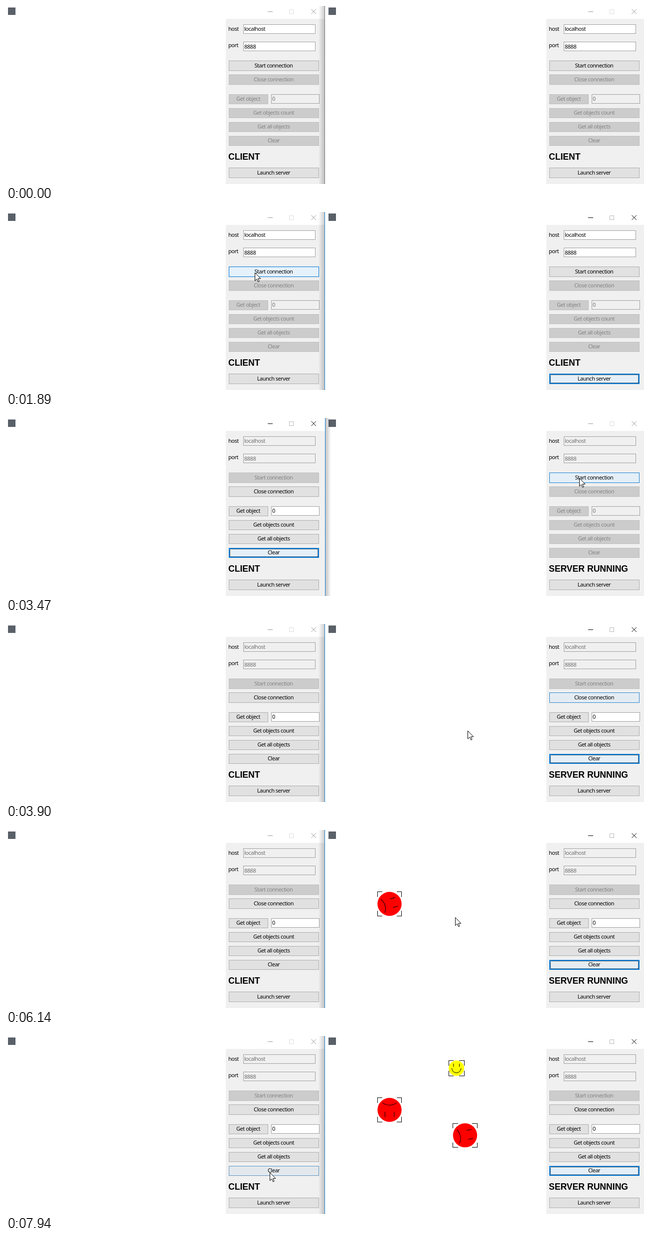
An HTML page that plays this animation: 1280 by 359 pixels, repeating every 7990 ms.

```html
<!DOCTYPE html>
<html lang="en">
<head>
<meta charset="utf-8">
<title>Client and server windows</title>
<style>
  html, body { margin: 0; width: 100%; height: 100%; overflow: hidden; background: #fff; }
  svg { display: block; width: 1280px; height: 359px; }
  text { font: 11px "Noto Sans", "Open Sans", sans-serif; letter-spacing: -.5px; white-space: pre; }
  .title { font: bold 17.6px "Liberation Sans", Arial, sans-serif; letter-spacing: 0; }
  .crisp { shape-rendering: crispEdges; }
</style>
</head>
<body>
<svg id="stage" viewBox="0 0 1280 359">
  <defs>
    <linearGradient id="toRight"><stop offset="0" stop-opacity="0"/><stop offset="1" stop-opacity=".2"/></linearGradient>
    <linearGradient id="toLeft"><stop offset="0" stop-opacity=".24"/><stop offset="1" stop-opacity="0"/></linearGradient>
  </defs>
</svg>
<script>
const LOOP = 7990;
const CLICK = { launch: 450, startLeft: 1940, startRight: 3560 };
const LINKED = { left: 2050, right: 3615 };

// Bursts of screen updates: first time, last time, number of updates.
const BURSTS = [
  [310, 820, 10], [1050, 1840, 18], [1890, 1890, 1], [2020, 2630, 14], [2700, 3470, 17],
  [3520, 4310, 18], [4360, 5150, 18], [5180, 5940, 17], [5990, 6780, 18],
  [6830, 7580, 17], [7630, 7940, 8]
];

// Pointer path: time, x, y. Equal neighbours are rests.
const PATH = [
  [310, 1105, 362], [520, 1124, 338], [1050, 1124, 338], [1450, 820, 215], [1690, 545, 135],
  [1840, 499, 122], [2100, 499, 122], [2320, 540, 146], [2480, 622, 158], [2630, 650, 197],
  [2700, 650, 197], [3000, 820, 182], [3300, 1085, 128], [3470, 1150, 121], [3590, 1150, 121],
  [3720, 1100, 148], [3900, 920, 218], [4150, 795, 287], [4310, 757, 303], [4360, 757, 303],
  [4860, 769, 149], [5150, 769, 149], [5500, 868, 222], [5850, 903, 142], [6140, 901, 177],
  [6500, 920, 199], [6620, 920, 199], [7100, 906, 78], [7200, 904, 65], [7280, 904, 65],
  [7430, 894, 102], [7580, 669, 210], [7760, 560, 264], [7940, 529, 275]
];

// Buttons: x, y, width, text baseline, label.
const BUTTONS = {
  start: [447, 110, 180, 124, 'Start connection'],
  close: [447, 138, 180, 152, 'Close connection'],
  get: [447, 178, 78, 191, 'Get object'],
  count: [447, 206, 180, 219, 'Get objects count'],
  all: [447, 234, 180, 247, 'Get all objects'],
  clear: [447, 262, 180, 275, 'Clear'],
  launch: [447, 326, 180, 340, 'Launch server']
};

// Times at which the pointer enters and leaves a button.
const HOVERS = {
  left: { start: [1640, 2050], close: [2260, 2420], clear: [7850, 9000] },
  right: { launch: [400, 1090], start: [3300, 3615], close: [3620, 3790] }
};

const stage = document.getElementById('stage');
const clamp = v => Math.max(0, Math.min(1, v));

function set(node, attrs) {
  for (const key in attrs) node.setAttribute(key, attrs[key]);
  return node;
}

function add(parent, tag, attrs = {}, label) {
  const node = set(document.createElementNS('http://www.w3.org/2000/svg', tag), attrs);
  if (label !== undefined) node.textContent = label;
  return parent.appendChild(node);
}

const show = (node, on) => { node.style.display = on ? '' : 'none'; };

function mix(from, to, amount) {
  return `rgb(${from.map((c, i) => Math.round(c + (to[i] - c) * amount))})`;
}

function box(parent, x, y, width, height, attrs) {
  return add(parent, 'rect', { x: x + .5, y: y + .5, width, height, class: 'crisp', ...attrs });
}

function makeField(parent, x, y, width, baseline, value) {
  const frame = box(parent, x, y, width, 18, { stroke: '#a0a0a0' });
  const text = add(parent, 'text', { x: x + 2, y: baseline }, value);
  return enabled => {
    set(frame, { fill: enabled ? '#fff' : '#f0f0f0' });
    set(text, { fill: enabled ? '#000' : '#707070' });
  };
}

function makeButton(parent, [x, y, width, baseline, label]) {
  const height = y > 170 && y < 300 ? 19 : 20;
  const frame = box(parent, x, y, width, height);
  const inner = box(parent, x + 1, y + 1, width - 2, height - 2, { fill: 'none', stroke: '#0078d7' });
  const dots = box(parent, x + 2, y + 2, width - 4, height - 4,
    { fill: 'none', stroke: '#000', 'stroke-dasharray': '1 1' });
  const text = add(parent, 'text', { x: x + width / 2, y: baseline, 'text-anchor': 'middle' }, label);
  return ({ enabled, hover, focused, pressed, pulse }) => {
    const glow = focused ? Math.max(hover, pulse) : hover;
    set(frame, {
      fill: !enabled ? '#ccc' : pressed ? '#cce4f7' : mix([225, 225, 225], [229, 241, 251], glow),
      stroke: !enabled ? '#bfbfbf' : focused ? '#0078d7' : mix([173, 173, 173], [0, 120, 215], hover)
    });
    set(text, { fill: enabled ? '#000' : '#838383' });
    show(inner, enabled && focused);
    show(dots, enabled && focused);
  };
}

function makeWindow(side, offset) {
  const root = add(stage, 'g', { transform: `translate(${offset} 0)` });
  add(root, 'rect', { x: 441, y: 26, width: 200, height: 333, fill: '#f0f0f0' });
  add(root, 'rect', { x: 4, y: 3, width: 15, height: 15, fill: '#596068' });
  const controls = add(root, 'g', { fill: 'none' });
  add(controls, 'path', { d: 'M525 11.5h10', class: 'crisp' });
  add(controls, 'path', { d: 'M612.5 6.5l9.5 9.5m0-9.5l-9.5 9.5' });
  const maximize = box(root, 568, 7, 8, 8, { fill: 'none' });
  add(root, 'text', { x: 446, y: 50 }, 'host');
  add(root, 'text', { x: 446, y: 83 }, 'port');
  const host = makeField(root, 476, 37, 144, 50, 'localhost');
  const port = makeField(root, 476, 72, 144, 86, '8888');
  const index = makeField(root, 532, 178, 96, 191, '0');
  const title = add(root, 'text', { x: 446, y: 310, class: 'title' });
  const buttons = Object.entries(BUTTONS).map(([name, spec]) => [name, makeButton(root, spec)]);

  return (t, { active, focus, pressed }) => {
    const linked = t >= LINKED[side];
    const editable = t < LINKED.left;
    set(controls, { stroke: active ? '#000' : '#999' });
    set(maximize, { stroke: active ? '#bbb' : '#ddd' });
    host(editable);
    port(editable);
    index(linked);
    title.textContent = side === 'right' && !editable ? 'SERVER RUNNING' : 'CLIENT';
    const pulse = .6 + .35 * Math.cos((t - 7685) / 1000 * Math.PI);
    for (const [name, update] of buttons) {
      const [enter, leave] = HOVERS[side][name] || [1e5, 1e5];
      update({
        enabled: name === 'launch' || (name === 'start' ? !linked : linked),
        hover: clamp((t - enter) / 200) * clamp(1 - (t - leave) / 350),
        focused: active && focus === name,
        pressed: pressed === name,
        pulse
      });
    }
  };
}

function makeBall(cx, cy, color, happy) {
  const root = add(stage, 'g', { transform: `translate(${cx} ${cy})`, fill: 'none', stroke: '#000' });
  const disc = add(root, 'circle', { fill: color, stroke: 'none' });
  const face = add(root, 'path');
  const corners = add(root, 'path', { class: 'crisp' });
  return (visible, radius, angle) => {
    show(root, visible);
    if (!visible) return;
    const n = share => (share * radius).toFixed(2);
    const eyes = `M${n(-.38)} ${n(-.6)}V${n(-.18)}M${n(.38)} ${n(-.6)}V${n(-.18)}`;
    const mouth = happy
      ? `M${n(-.6)} 0A${n(.6)} ${n(.6)} 0 0 0 ${n(.6)} 0`
      : `M${n(-.58)} ${n(.58)}A${n(1)} ${n(1)} 0 0 1 ${n(.58)} ${n(.58)}`;
    set(disc, { r: radius });
    set(face, { d: eyes + mouth, transform: `rotate(${angle})` });
    const leg = 10;
    set(corners, {
      d: [[-1, -1], [1, -1], [1, 1], [-1, 1]].map(([sx, sy]) =>
        `M${sx * (radius - leg)} ${sy * radius}H${sx * radius}V${sy * (radius - leg)}`).join('')
    });
  };
}

function screenTime(t) {
  const burst = BURSTS.filter(b => b[0] <= t).pop();
  if (!burst) return 0;
  const [first, last, count] = burst;
  if (count === 1) return first;
  const step = (last - first) / (count - 1);
  return first + Math.min(count - 1, Math.floor((t - first) / step + 1e-6)) * step;
}

const isRest = (a, b) => a[1] === b[1] && a[2] === b[2];

function slope(i, axis) {
  const before = PATH[i - 1], here = PATH[i], after = PATH[i + 1];
  if (!before || !after || isRest(before, here) || isRest(here, after)) return 0;
  return (after[axis] - before[axis]) / (after[0] - before[0]);
}

function pointerAt(t) {
  let i = PATH.findIndex(p => p[0] > t) - 1;
  if (i < 0) i = PATH.length - 2;
  const a = PATH[i], b = PATH[i + 1], span = b[0] - a[0], u = clamp((t - a[0]) / span);
  return [1, 2].map(axis => {
    const rise = u * u * (3 - 2 * u);
    return a[axis] + (b[axis] - a[axis]) * rise
      + span * (slope(i, axis) * u * (1 - u) ** 2 - slope(i + 1, axis) * u * u * (1 - u));
  });
}

const left = makeWindow('left', 0);
const right = (() => {
  add(stage, 'rect', { x: 640, y: 0, width: 640, height: 359, fill: '#fff' });
  return makeWindow('right', 643);
})();
const shadowLeft = add(stage, 'rect', { x: 627, y: 0, width: 12, height: 359, fill: 'url(#toRight)' });
const shadowRight = add(stage, 'rect', { x: 641, y: 0, width: 11, height: 359, fill: 'url(#toLeft)' });
const edge = add(stage, 'rect', { y: 0, width: 1, height: 359 });
const ballA = makeBall(769.5, 149, '#f00');
const ballB = makeBall(921, 200.3, '#f00');
const ballC = makeBall(903.7, 65, '#ff0', true);
const pointer = add(stage, 'path', {
  d: 'M.5.5V16.7l3.7-3.5 2.6 5.7 2.3-1-2.5-5.6h5.2z', fill: '#fff', stroke: '#000'
});

function draw(t) {
  const leftActive = t >= CLICK.startLeft && t < CLICK.startRight;
  const rightActive = t >= CLICK.launch && !leftActive;
  left(t, {
    active: leftActive,
    focus: t < LINKED.left ? 'start' : 'clear',
    pressed: leftActive && t < LINKED.left ? 'start' : ''
  });
  right(t, {
    active: rightActive,
    focus: t < CLICK.startLeft ? 'launch' : t < LINKED.right ? 'start' : 'clear',
    pressed: t >= CLICK.startRight && t < LINKED.right ? 'start' : ''
  });
  show(shadowLeft, !leftActive);
  show(shadowRight, leftActive);
  set(edge, { x: leftActive ? 640 : 639, fill: leftActive || rightActive ? '#1883d7' : '#777' });

  const spin = .0589;
  ballA(t >= 4884, 24.2, (t - 4884) * spin);
  ballB(t >= 6599, 24.2, (t - 6599) * spin);
  ballC(t >= 7218, 24 - (t - 7218) * .0118, 0);

  show(pointer, t >= PATH[0][0]);
  set(pointer, { transform: `translate(${pointerAt(t).map(Math.round)})` });
}

function tick() {
  draw(screenTime(performance.now() % LOOP));
  requestAnimationFrame(tick);
}
tick();
</script>
</body>
</html>
```
